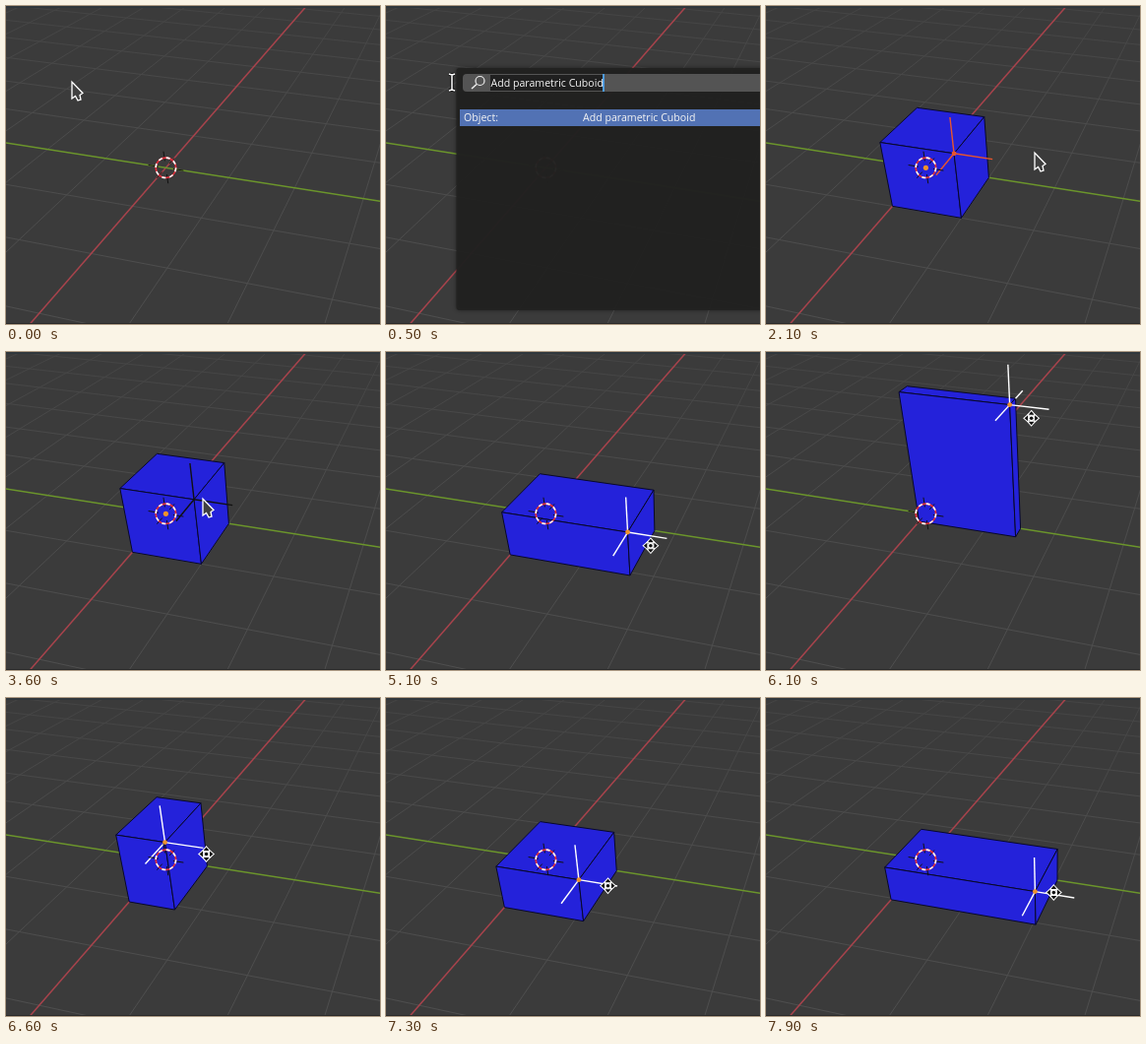
An HTML page with a canvas that plays this animation: 380 by 323 pixels, repeating every 8 s.

```html
<!DOCTYPE html>
<html lang="en">
<head>
<meta charset="utf-8">
<style>
html, body { margin: 0; width: 100%; height: 100%; overflow: hidden; background: #3b3b3b; }
canvas { display: block; }
</style>
</head>
<body>
<canvas id="stage" width="380" height="323"></canvas>
<script>
const ctx = document.getElementById('stage').getContext('2d');
const LOOP = 8000, STEP = 100;
const BLUE = '#2422da', ORANGE = '#f0922c', RED = '#e8552d';

// Keys are [time, ...values], linear in between.
const pointerKeys = [
  [0, 67, 77], [600, 67, 77], [1100, 247, 110], [1600, 246, 109], [1900, 257, 144],
  [2000, 257, 144], [2100, 273, 149], [2200, 276, 152], [2400, 272, 150], [2500, 272, 150],
  [3000, 161, 156], [3400, 197, 150], [3500, 197, 150], [3600, 200, 149], [3800, 222, 153],
  [4000, 219, 156]
];
const sizeKeys = [
  [4800, 1, 1, 1], [5100, 1.06, 1.7, .68], [5400, .72, 2.3, .98], [5700, .32, 2.51, 1.39],
  [6000, .17, 2.02, 1.88], [6150, .24, 1.22, 2.03], [6350, .75, .3, 1.59], [6450, 1.01, .23, 1.23],
  [6600, 1.085, .661, 1.04], [6900, .8, .72, 1.39], [7100, .83, 1.12, 1.2], [7300, 1.21, 1.12, .65],
  [7500, 1, 1.02, 1.02], [7700, 1.13, 1.6, .61], [7900, 1.035, 2.04, .525]
];
// Pointer position relative to the dragged corner
const gripKeys = [[4800, 32, 13], [5700, 6, 15], [6600, 42, 12], [7900, 19, 1]];

function at(keys, t) {
  const i = keys.findIndex(k => k[0] > t);
  if (i === 0) return keys[0].slice(1);
  if (i < 0) return keys[keys.length - 1].slice(1);
  const a = keys[i - 1], b = keys[i], f = (t - a[0]) / (b[0] - a[0]);
  return a.slice(1).map((v, j) => v + (b[j + 1] - v) * f);
}

// Perspective camera: world (x, y, z) to pixels
function project([x, y, z = 0]) {
  const w = 1 - .0942 * x - .0213 * y - .065 * z;
  return [(162.4 - 46.06 * x + 59.18 * y - 18.95 * z) / w,
          (164.3 + 19.88 * x + 6.29 * y - 67.7 * z) / w];
}

function path(points, closed) {
  ctx.beginPath();
  points.forEach(p => ctx.lineTo(...p));
  if (closed) ctx.closePath();
}

function stroke(color, width) {
  ctx.strokeStyle = color;
  ctx.lineWidth = width;
  ctx.stroke();
}

function line(points, color, width = 1) {
  path(points.map(project));
  stroke(color, width);
}

function dot([x, y], r, color) {
  ctx.beginPath();
  ctx.arc(x, y, r, 0, 7);
  ctx.fillStyle = color;
  ctx.fill();
}

function rect(x, y, w, h, color, r = 0) {
  ctx.fillStyle = color;
  ctx.beginPath();
  ctx.roundRect(x, y, w, h, r);
  ctx.fill();
}

const fade = ctx.createLinearGradient(0, 0, 0, 323);
fade.addColorStop(0, '#444');
fade.addColorStop(.35, '#4b4b4b');
fade.addColorStop(1, '#4e4e4e');

function drawFloor() {
  rect(0, 0, 380, 323, '#3b3b3b');
  for (let x = -30; x <= 4; x++) if (x) line([[x, -30], [x, 14]], fade);
  for (let y = -30; y <= 14; y++) if (y) line([[-30, y], [4, y]], fade);
  line([[-30, 0], [4, 0]], '#a8434c', 1.5);
  line([[0, -30], [0, 14]], '#6b952b', 1.5);
  rect(0, 0, 380, 2, '#30373c');
  rect(0, 322, 380, 1, '#2a2a2a');
}

function drawBox([a, b, c]) {
  const faces = [
    [[0, 0, c], [0, b, c], [a, b, c], [a, 0, c]],
    [[a, 0, 0], [a, b, 0], [a, b, c], [a, 0, c]],
    [[0, b, 0], [a, b, 0], [a, b, c], [0, b, c]]
  ];
  for (const face of faces) {
    path(face.map(project), true);
    ctx.fillStyle = BLUE;
    ctx.fill();
    stroke('#08082a', 1);
  }
}

// Axes of the corner handle; inner halves show only where they leave the box
function drawHandle(size, color, dotColor) {
  for (let i = 0; i < 3; i++) {
    const move = v => size.map((s, j) => j === i ? v : s);
    line([size, move(size[i] + .5)], color, 1.4);
    if (size[i] < .5) line([move(0), move(size[i] - .5)], color, 1.4);
  }
  if (dotColor) dot(project(size), 2.4, dotColor);
}

function drawCursor3d() {
  for (let i = 0; i < 3; i++)
    for (const s of [-1, 1])
      line([.12, .285].map(d => [0, 1, 2].map(j => j === i ? s * d : 0)), '#111');
  const [x, y] = project([0, 0, 0]);
  ctx.beginPath();
  ctx.arc(x, y, 10.2, 0, Math.PI * 2);
  stroke('#e0303c', 1.6);
  ctx.setLineDash([10.2 * Math.PI / 8]);
  stroke('#fff', 1.6);
  ctx.setLineDash([]);
}

function text(s, x, y) {
  ctx.font = '10.6px "Open Sans", "Noto Sans", sans-serif';
  ctx.fillStyle = '#f4f4f4';
  ctx.fillText(s, x, y);
}

function drawSearch() {
  ctx.shadowColor = 'rgba(0,0,0,.45)';
  ctx.shadowBlur = 4;
  rect(71.5, 63, 320, 246, 'rgba(34,34,33,.96)', 3);
  ctx.shadowBlur = 0;
  rect(78, 69, 320, 18, '#545454', 4);
  rect(106, 70, 115, 16, '#202020');
  rect(220, 69, 2, 18, '#4e9be0');
  ctx.beginPath();
  ctx.arc(95.5, 76, 4.5, 0, 7);
  stroke('#eee', 1.2);
  path([[92, 79.5], [87, 84]]);
  stroke('#eee', 1.5);
  rect(75, 105, 320, 17, '#5272b4');
  text('Add parametric Cuboid', 106.5, 82);
  text('Object:', 79, 117);
  text('Add parametric Cuboid', 200, 117);
}

const arrow = [[0, 0], [0, 17], [3.5, 14.5], [6, 19], [9, 18], [8, 13.5], [11, 11.5]];
const beam = [[-3, -8], [0, -7], [3, -8], [0, -7], [0, 8], [-3, 9], [0, 8], [3, 9]];
const head = [[0, -7], [3, -3.5], [-3, -3.5]];

function drawPointer(kind, x, y) {
  ctx.save();
  ctx.translate(x, y);
  if (kind === 'arrow') {
    path(arrow, true);
    ctx.fillStyle = '#404040';
    ctx.fill();
    stroke('#fff', 1.3);
  } else if (kind === 'beam') {
    path(beam);
    stroke('#111', 3.4);
    stroke('#fff', 1.5);
  } else {
    for (let i = 0; i < 4; i++) {
      path(head, true);
      stroke('#fff', 2);
      ctx.fillStyle = '#111';
      ctx.fill();
      ctx.rotate(Math.PI / 2);
    }
    dot([0, 0], 3, '#fff');
    dot([0, 0], 1.8, '#111');
  }
  ctx.restore();
}

function draw(t) {
  const searching = t >= 500 && t < 1400;
  const size = at(sizeKeys, t);
  drawFloor();
  if (t >= 1400) {
    drawBox(size);
    if (t < 2200) drawHandle(size, RED, RED);
    else if (t < 3900) drawHandle(size, '#111');
    else drawHandle(size, '#fff', ORANGE);
    if (t < 3900) dot(project([0, 0, 0]), 2.6, ORANGE);
  }
  drawCursor3d();
  if (searching) drawSearch();

  if (t < 4700) {
    drawPointer(searching ? 'beam' : 'arrow', ...at(pointerKeys, t));
  } else {
    const [x, y] = project(size), [dx, dy] = at(gripKeys, t);
    drawPointer('move', x + dx, y + dy);
  }
}

function tick() {
  draw(Math.floor(performance.now() % LOOP / STEP) * STEP);
  requestAnimationFrame(tick);
}
tick();
</script>
</body>
</html>
```
